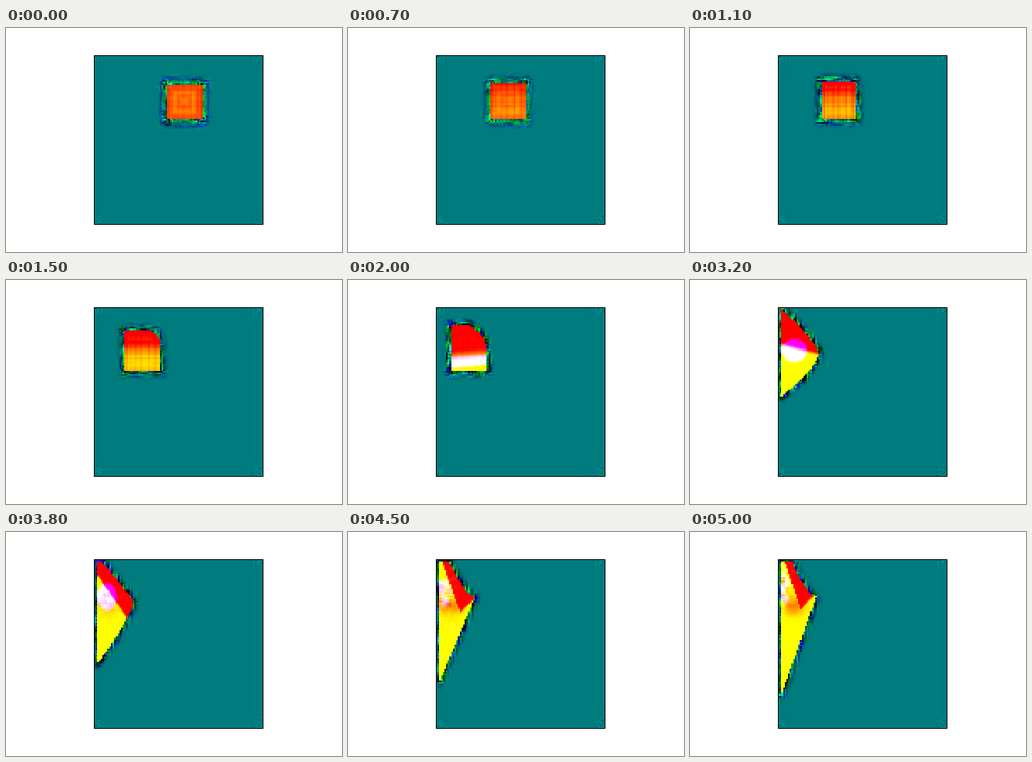
Write a matplotlib script that moves like this. It is 432 px wide and 288 px high and loops after 5100 ms.

```python
import numpy as np
import matplotlib.pyplot as plt
from matplotlib.animation import FuncAnimation

FRAMES, STEP = 51, 100
N = 100  # cells per side
TEAL_G, TEAL_B = 0.486, 0.498
Y, X = np.mgrid[0:N, 0:N] + 0.5


def ramp(s, start, end):
    return np.clip((s - start) / (end - start), 0, 1)


def bump(s, centre, width):
    return np.exp(-((s - centre) / width) ** 2)


def ellipse(cx, cy, rx, ry, tilt=0):
    dx = X - cx
    return (dx / rx) ** 2 + ((Y - cy - tilt * dx) / ry) ** 2


def smear(field, axis, reach):
    """Average along one axis, keeping the contrast."""
    rolls = [np.roll(field, k, axis=axis) for k in range(-reach, reach + 1)]
    return np.mean(rolls, axis=0) * np.sqrt(len(rolls))


rng = np.random.default_rng(4)
NOISE = rng.uniform(-1, 1, (14, 3, N, N))
ROWS = rng.uniform(-1, 1, N)
COLS = rng.uniform(-1, 1, N)


def border_marks():
    edge = np.minimum.reduce([X, Y, N - X, N - Y])
    marks = .012 * np.cos(edge) * np.exp(-edge / 3)
    for cx in (0, N):
        for cy in (0, N):
            far = np.hypot(X - cx, Y - cy)
            marks += .1 * NOISE[0, 0] * bump(far, 0, 6)
    marks[:, 94] += .015
    return marks


MARKS = border_marks()


class Blob:
    """A square that slides to the left wall, melts and droops."""

    def __init__(self, s):
        self.s = s
        self.melt = ramp(s, .9, 3.2)
        self.late = ramp(s, 3.2, 4.6)
        self.left = max(2, 43 - 14 * s - 1.6 * s ** 2)
        self.top = max(1.6, 17.6 - 1.55 * s ** 2)
        self.bottom = max(38.4, 38.4 + 15.3 * (s - 2.25))
        self.tip = 28 - 5.5 * self.late
        self.width = 20.7 + 1.3 * self.melt - 1.3 * self.late

    def reach(self, y):
        """Width at height y: widest at the tip, narrowing both ways."""
        up = np.clip((self.tip - y) / (self.tip - self.top), 0, 1)
        down = np.clip((y - self.tip) / (self.bottom - self.tip), 0, 1)
        cap = 1 - self.melt + .3 * self.late
        foot = 1 - ramp(self.s, 2.2, 3.2)
        up_power = 1.4 - .8 * self.late + 3 * (1 - self.melt)
        down_power = 1.5 - .5 * self.late + 3 * foot
        return self.width * (1 - (1 - cap) * up ** up_power
                             - (1 - foot) * down ** down_power)

    def distance(self):
        """Mask of the blob and distance of each cell to its edge."""
        inside = ((X >= self.left) & (X <= self.left + self.reach(Y))
                  & (Y >= self.top) & (Y <= self.bottom))
        ys = np.linspace(self.top, self.bottom, 70)
        u = np.linspace(0, 1, 20)
        px = self.left + np.concatenate([
            self.reach(ys), 0 * ys,
            u * self.reach(self.top), u * self.reach(self.bottom)])
        py = np.concatenate([ys, ys, 0 * u + self.top, 0 * u + self.bottom])
        dist2 = (X[..., None] - px) ** 2 + (Y[..., None] - py) ** 2
        return inside, np.sqrt(dist2.min(axis=2))


def paint_inside(blob, depth, noise, streaks):
    s, late = blob.s, blob.late
    turn = bump(s, 2.4, .45)
    dx = X - blob.left

    # red above the fold, yellow below
    fold = (1 - late) * (29 - 2.3 * s + 9.5 * turn) - 4.5 * late
    slope = .28 * ramp(s, 2.4, 3.2) - .17 * turn + 2.7 * late
    rise = np.maximum(Y - fold - slope * dx,
                      Y - blob.tip - late * (18.5 - dx) - 40 * (1 - late))
    steep = .004 + .045 * s ** 2
    limit = .55 + .45 * ramp(s, .7, 2)
    green = np.clip(.42 + steep * rise, 0, limit)

    fresh = 1 - ramp(s, 0, 2.4)
    green += fresh * (.07 * np.cos(1.3 * depth) - .4 * np.exp(-.9 * depth))
    green += (.05 + .08 * bump(s, 1.3, .6)) * min(1, 2 * fresh) * streaks
    green += 1.4 * bump(s, 2.4, .3) * np.exp(-ellipse(6, 21, 4, 3) ** 2)
    green -= .55 * late * np.exp(-ellipse(9, 28, 6, 5))

    # a magenta and white band that shrinks towards the wall
    u = s - 2.4
    e = ellipse(12.5 - 3.5 * u, 30.5 - 5.6 * u,
                8 + 32 * (1 - ramp(s, 2.4, 3)) - 4 * late,
                max(1, 5 + 2.6 * u), -.17 * turn)
    blue = 5 * ramp(s, 1.8, 2.4) * (1 - .85 * late) * (1 - e)

    soft = smear(smear(noise, 1, 1), 2, 1)
    speck = late * np.exp(-.6 * e)
    return np.dstack([np.ones((N, N)), green + .5 * speck * soft[0],
                      blue + speck * soft[1]])


def paint_outside(blob, d, noise, streaks):
    rough = .3 + .7 * ramp(blob.s, 0, 2.4)
    calm = 1 - rough
    right = blob.left + blob.width

    # ripples run along the nearest edge, loose grains sit at the corners
    beside = (Y > blob.top) & (Y < blob.bottom)
    along = np.where(beside, smear(noise, 1, 2), smear(noise, 2, 2))
    near = np.hypot(np.minimum(abs(X - blob.left), abs(X - right)),
                    np.minimum(abs(Y - blob.top), abs(Y - blob.bottom)))
    grain = .6 * along * rough + noise * (.25 * rough
                                          + .8 * calm * bump(near, 0, 4))

    env = bump(d, 0, 2.4 + 2 * calm)
    ring = calm * np.sin(1.2 * d) * (1 + .5 * streaks)
    halo = .03 * np.cos(d) * np.exp(-d / 2.5)
    dark = .22 * rough
    red = env * rough * np.clip(grain[2] - .6, 0, 1)
    green = TEAL_G + env * (.4 * ring + grain[0] - dark) + halo
    blue = TEAL_B + env * (-.3 * ring + grain[1] - dark) + halo
    return np.dstack([red, green, blue])


def picture(frame):
    blob = Blob(frame * STEP / 1000)
    inside, d = blob.distance()
    shift = int(round(blob.left))

    # the grain drifts with the blob and slowly changes
    i, mix = divmod(frame, 4)
    noise = NOISE[i] + (NOISE[i + 1] - NOISE[i]) * mix / 4
    noise = np.roll(noise, shift, axis=2)
    streaks = ROWS[:, None] + np.roll(COLS, shift)

    rgb = paint_outside(blob, d, noise, streaks)
    rgb[..., 1:] += MARKS[..., None] * min(1, .6 + frame / 10)
    rgb[inside] = paint_inside(blob, d, noise, streaks)[inside]
    return np.clip(rgb, 0, 1)


fig = plt.figure(figsize=(6, 4), dpi=72, facecolor="white")
ax = fig.add_axes([0.125, 0.125, 0.775, 0.755])
image = ax.imshow(picture(0), interpolation="nearest")
ax.set_xticks([])
ax.set_yticks([])
for spine in ax.spines.values():
    spine.set_linewidth(1)


def update(frame):
    image.set_data(picture(frame))
    return [image]


anim = FuncAnimation(fig, update, frames=FRAMES, interval=STEP,
                     repeat=True, repeat_delay=0)
plt.show()
```
